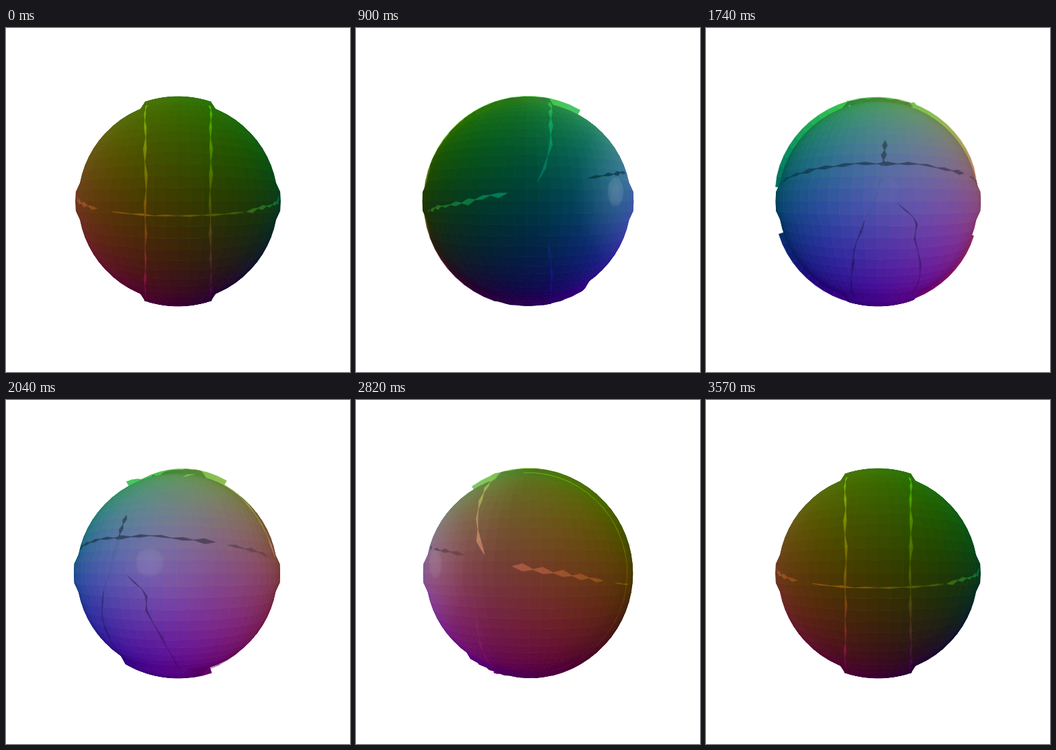
An HTML page with a canvas for the animation above (3.6 s loop, 512 by 512 pixels).

```html
<!DOCTYPE html>
<html>
<head>
<meta charset="utf-8">
<style>
html, body { margin: 0; width: 100%; height: 100%; overflow: hidden; background: #fff; }
canvas { display: block; }
</style>
</head>
<body>
<canvas id="stage" width="512" height="512"></canvas>
<script>
const ctx = document.getElementById('stage').getContext('2d');
const { PI, sin, cos, abs, max, min, floor, hypot, atan2, sign, tanh } = Math;
const RAD = PI / 180, CX = 256, CY = 258, FOCAL = 443, DIST = 3.12, LIMB = 1 / DIST;
const LIGHT_LON = 182 * RAD, LIGHT = direction(LIGHT_LON, 9 * RAD);

let seed = 7;
const random = () => (seed = seed * 16807 % 2147483647) / 2147483647;

function direction(lon, lat) {
  return [cos(lat) * sin(lon), sin(lat), cos(lat) * cos(lon)];
}

function normalize(v) {
  const len = hypot(...v);
  return v.map(c => c / len);
}

// Turn about the vertical axis, then view in perspective
function project([x, y, z], radius, turn) {
  const c = cos(turn), s = sin(turn), depth = z * c + x * s;
  const scale = FOCAL * radius / (DIST - radius * depth);
  return [CX + (x * c - z * s) * scale, CY - y * scale, depth];
}

function color([x, y, z], shade) {
  const channels = [.5 - .5 * x, .5 + .58 * y, .5 - .5 * z - .2 * y];
  return 'rgb(' + channels.map(c => floor(255 * shade * max(0, min(1, c)))).join() + ')';
}

function surfaceShade(v) {
  return .46 + .21 * max(0, v[0] * LIGHT[0] + v[1] * LIGHT[1] + v[2] * LIGHT[2]);
}

const stripEdge = y => .24 + .08 * y * y;

function radiusAt([x, y, z]) {
  if (abs(x) < stripEdge(y) && (z > -.21 || y < -.8)) return 1.035;
  return .985 + .035 * z * z + (abs(y) < .12 ? .025 : 0);
}

function fillShape(points, fill, edge) {
  ctx.beginPath();
  for (const p of points) ctx.lineTo(p[0], p[1]);
  ctx.closePath();
  ctx.fillStyle = ctx.strokeStyle = fill;
  ctx.fill();
  ctx.lineWidth = edge;
  ctx.stroke();
}

const STEP = 5 * RAD, facets = [];
for (let i = 0; i < 36; i++) {
  for (let j = 0; j < 72; j++) {
    const at = (u, v) => direction((j + u) * STEP, (i + v) * STEP - PI / 2);
    const corners = [at(0, 0), at(1, 0), at(1, 1), at(0, 1)].map(v => ({ v, r: radiusAt(v) }));
    const mid = at(.5, .5);
    facets.push({ corners, mid, fill: color(mid, surfaceShade(mid)) });
  }
}

// Paths take degrees (or a point index) and give a unit vector
const belt = lon => direction(lon * RAD, (5 - 11 * cos(lon * RAD)) * RAD);
const strip = side => t => {
  const y = sin(t * RAD);
  return normalize([side * stripEdge(y), y, cos(t * RAD)]);
};
const arch = t => {
  const y = sin(t * RAD);
  return normalize([cos(t * RAD), y, -.21 * tanh(3 * abs(y))]);
};
const through = points => t => {
  const i = min(floor(t), points.length - 2);
  const mix = k => points[i][k] + (points[i + 1][k] - points[i][k]) * (t - i);
  return direction(mix(0) * RAD, mix(1) * RAD);
};

const X = 0, Y = 1, Z = 2, cracks = [];

// A jagged ribbon whose shards swell and shrink along one axis
function crack(path, from, to, steps, width, shade, axis, wall = false) {
  const nodes = [];
  for (let i = 0; i <= steps; i++) {
    const mid = path(from + (to - from) * i / steps);
    const half = width * (i % 2 ? .5 + random() : .12), drift = (random() - .5) * width;
    const shift = d => normalize(mid.map((c, k) => k === axis ? c + d : c));
    nodes.push({ mid, a: shift(drift - half), b: shift(drift + half) });
  }
  for (let i = 0; i < steps; i++) {
    cracks.push({ from: nodes[i], to: nodes[i + 1], fill: color(nodes[i].mid, shade), wall });
  }
}

crack(belt, -82, -40, 10, .02, .65, Y);
crack(belt, -30, 30, 12, .006, .8, Y);
crack(belt, 32, 82, 14, .018, .92, Y);
crack(belt, 118, 222, 22, .014, .42, Y);
crack(belt, 228, 255, 6, .012, .46, Y);
for (const side of [-1, 1]) crack(strip(side), -72, 120, 30, .01, .78, X, true);
crack(arch, 8, 172, 28, .014, .75, Z, true);
crack(arch, -75, -18, 10, .009, .65, Z, true);
crack(arch, 200, 255, 10, .011, .55, Z, true);
crack(through([[179, 27], [178, 15]]), 0, 1, 5, .016, .42, X);
crack(through([[178, 15], [174, -1], [170, -8]]), 0, 2, 6, .011, .66, X);
crack(through([[170, -8], [165, -20], [163, -29], [152, -60]]), 0, 3, 8, .009, .44, X);
crack(through([[184, -1], [192, -8], [192, -16], [199, -32], [207, -56]]), 0, 4, 10, .01, .46, X);

function drawWalls(turn) {
  for (const { from, to, fill, wall } of cracks) {
    const z = project(from.mid, 1, turn)[2];
    if (!wall || z > LIMB + .08 || z < -.25) continue;
    fillShape([project(from.mid, .96, turn), project(from.mid, 1.04, turn),
      project(to.mid, 1.04, turn), project(to.mid, .96, turn)], fill, .5);
  }
}

function drawCracks(turn) {
  for (const { from, to, fill } of cracks) {
    if (project(from.mid, 1, turn)[2] < LIMB) continue;
    fillShape([from.a, to.a, to.b, from.b].map(v => project(v, 1, turn)), fill, .4);
  }
}

function drawFacets(turn) {
  facets
    .map(facet => ({ facet, z: project(facet.mid, 1, turn)[2] }))
    .filter(item => item.z > .12)
    .sort((a, b) => a.z - b.z)
    .forEach(({ facet: { corners, fill } }) =>
      fillShape(corners.map(c => project(c.v, c.r, turn)), fill, .8));
}

// The reflection travels at half the speed of the turning light
function drawHighlight(turn) {
  const offset = atan2(sin(LIGHT_LON - turn), cos(LIGHT_LON - turn));
  const strength = .25 * min(1, abs(offset) / .7) * max(0, min(1, (1.95 - abs(offset)) / .25));
  const [x, y] = project(direction(offset / 2, 4.5 * RAD), 1, 0);
  const glow = ctx.createRadialGradient(0, 0, 0, 0, 0, 110);
  const stops = [[0, 1], [.17, .8], [.21, .4], [1, 0]];
  for (const [at, level] of stops) glow.addColorStop(at, `rgba(255,255,255,${strength * level})`);
  ctx.save();
  ctx.translate(x, y);
  ctx.scale(max(.35, cos(offset * .62)), 1);
  ctx.fillStyle = glow;
  ctx.fillRect(-110, -110, 220, 220);
  ctx.restore();
}

function draw(turn) {
  ctx.fillStyle = '#fff';
  ctx.fillRect(0, 0, 512, 512);
  drawWalls(turn);
  drawFacets(turn);
  drawHighlight(turn);
  drawCracks(turn);
}

let shown = -1;
function tick() {
  const step = floor(performance.now() / 30) % 120;
  if (step !== shown) draw((shown = step) / 119 * 2 * PI);
  requestAnimationFrame(tick);
}
tick();
</script>
</body>
</html>
```
